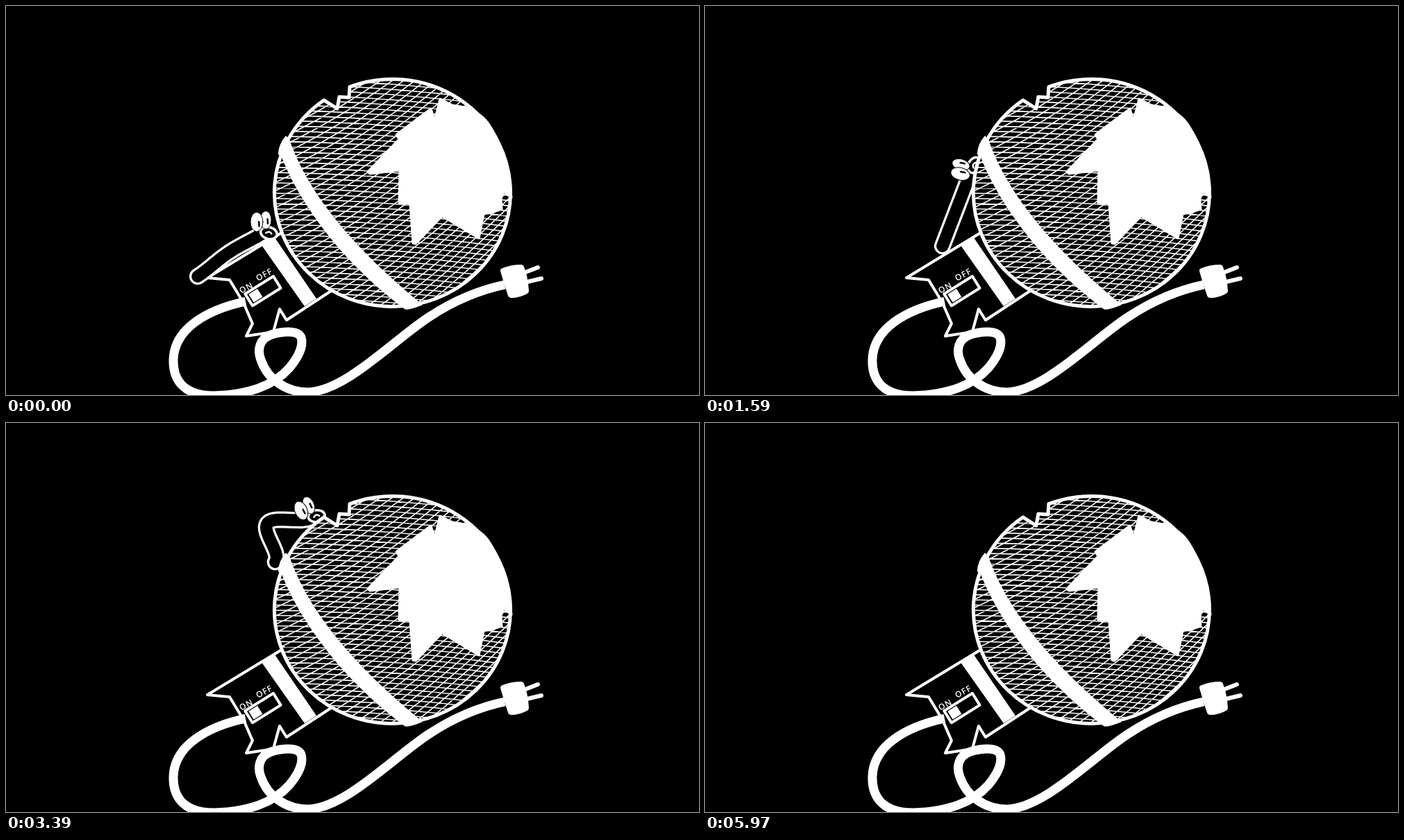
Recreate the animation shown at these times as an HTML page. Size 998x561 px, loop 7260 ms.

```html
<!DOCTYPE html>
<html lang="en">
<head>
<meta charset="utf-8">
<title>Worm and microphone</title>
<style>
  html, body { margin: 0; width: 100%; height: 100%; overflow: hidden; background: #000; }
  svg { display: block; width: 100%; height: 100%; }
  text { font: 600 12px "Open Sans", sans-serif; letter-spacing: 1px; fill: #fff; text-anchor: middle; }
</style>
</head>
<body>
<svg viewBox="0 0 998 561" fill="none" stroke-linejoin="round" stroke-linecap="round">
  <defs>
    <path id="ball" d="M495 116.6A170 164 0 0 1 726.5 269.5A170 164 0 0 1 556.5 433.5A170 164 0 0 1 386.5 269.5A170 164 0 0 1 458 135.8L477 148L480 131L494 132Z"/>
    <clipPath id="inside"><use href="#ball"/></clipPath>
    <!-- the way the worm crawls: handle, side of the ball, hole -->
    <path id="track" d="M276 390L374 325L386 224C384 190 402 150 444 134C460 126 480 118 488 134L490 260"/>
  </defs>
  <rect width="998" height="561" fill="#000"/>

  <g id="handle" stroke="#fff" stroke-width="4">
    <path fill="#000" d="M397 327L290 392L322 395L342 428L355 458L346 476L385 470L394 437L404 453L468 411"/>
    <path fill="#fff" stroke="none" d="M368 345L387 334L447 422L430 433Z"/>
    <g transform="translate(370 411) rotate(-32)">
      <rect x="-24" y="-10" width="48" height="20"/>
      <rect x="-20" y="-7" width="15" height="14" fill="#fff" stroke="none"/>
    </g>
    <g stroke="none">
      <text transform="translate(348 410) rotate(-28)">ON</text>
      <text transform="translate(374 391) rotate(-28)">OFF</text>
    </g>
  </g>

  <g id="cord" stroke="#fff">
    <path stroke-width="13" stroke-linecap="butt" d="M345 426C290 438 241 465 241 512C241 545 262 562 300 562C350 560 385 548 408 522C424 503 428 488 425 478C420 466 395 470 382 474C364 480 362 497 367 510C377 540 405 557 435 557C490 555 560 480 610 448C645 425 680 410 718 402"/>
    <path stroke-width="8" fill="#fff" d="M716 382Q728 377 742 377Q748 392 749 411Q739 417 727 417Q721 400 716 382Z"/>
    <path stroke-width="6" d="M748 384L766 377M750 398L771 393"/>
  </g>

  <g id="worm">
    <path class="body" stroke="#fff" stroke-width="24"/>
    <path class="body" stroke="#000" stroke-width="17.5"/>
    <g id="head">
      <ellipse cx="15" cy="14" rx="12" ry="8.5" fill="#000" stroke="#fff" stroke-width="3.5"/>
      <path d="M11 15Q15 10 19 14" stroke="#fff" stroke-width="2.5"/>
      <g fill="#fff" stroke="#000" stroke-width="1">
        <ellipse cx="6" cy="-3" rx="8" ry="13" transform="rotate(-15 6 -3)"/>
        <ellipse cx="-6" cy="3" rx="9" ry="14" transform="rotate(-15 -6 3)"/>
      </g>
      <path d="M-3 2L-1 8M8 -5L10 1" stroke="#000" stroke-width="2.5"/>
    </g>
  </g>

  <use href="#ball" fill="#000"/>
  <g clip-path="url(#inside)"><path id="mesh" stroke="#fff" stroke-width="1.6"/></g>
  <use href="#ball" stroke="#fff" stroke-width="5"/>
  <path fill="#fff" d="M403 187Q392 200 392 214L397 218C425 290 490 375 574 437Q578 440 600 431C520 365 440 285 408 192Z"/>
  <path fill="#fff" stroke="#fff" stroke-width="3" d="M625 134L643 143L661 146Q686 155 697 173Q717 205 722 235L728 276L722 272L717 267L713 278L714 293L702 297L688 300L681 335L628 303L590 343L586 342L582 285L566 284L567 237L524 242L521 239L566 192L562 186L568 181L612 148L617 166Z"/>
</svg>
<script>
const LOOP = 7260, STEP = 112.6, GONE = 53, LENGTH = 118;

const $ = id => document.getElementById(id);
const bodies = document.querySelectorAll(".body");

// Smooth 0 to 1 while k runs from a to b
function ease(k, a, b) {
  const u = Math.max(0, Math.min(1, (k - a) / (b - a)));
  return u * u * (3 - 2 * u);
}

function mesh() {
  let d = "";
  for (let y = 60; y < 460; y += 7.5) d += `M380 ${y}Q560 ${y + 2} 740 ${y + 28}`;
  for (let y = 90; y < 720; y += 12) d += `M380 ${y}Q560 ${y - 80} 740 ${y - 260}`;
  return d;
}

// Distances along the track: the head reaches out, then the tail is pulled in
const headAt = k => 116 + 125 * ease(k, 6, 18) + 90 * ease(k, 19, 30) + 46 * ease(k, 30, 40) + 90 * ease(k, 41, 50);
const tailAt = k => 30 * ease(k, 0, 6) + 118 * ease(k, 10, 19) + 95 * ease(k, 21, 30) + 157 * ease(k, 31, 56);
const tiltAt = k => 15 - 75 * ease(k, 6, 13) + 52 * ease(k, 19, 30) + 70 * ease(k, 30, 53);

// Straight line from tail to head, pushed outwards into a hump
function spine(tail, head, hump) {
  const dx = head.x - tail.x, dy = head.y - tail.y, len = Math.hypot(dx, dy);
  const points = [];
  for (let i = 0; i <= 30; i++) {
    const u = i / 30, bump = Math.sin(Math.PI * u) ** 2;
    const along = u - 0.07 * bump * hump / 44, out = hump * bump / len;
    points.push(`${tail.x + dx * along + dy * out} ${tail.y + dy * along - dx * out}`);
  }
  return "M" + points.join("L");
}

function draw(t) {
  const tick = Math.floor(t / 30) * 30;
  const k = Math.ceil((tick + 8) / STEP) - 1;
  $("worm").style.display = k < GONE ? "" : "none";
  if (k >= GONE) return;

  const from = tailAt(k), to = headAt(k), tilt = tiltAt(k);
  const tail = $("track").getPointAtLength(from), head = $("track").getPointAtLength(to);
  const slack = Math.max(0, Math.min(44, 1.9 * (LENGTH - to + from)));
  const hump = slack + (14 - slack) * ease(k, 31, 39);

  const d = spine(tail, head, hump);
  bodies.forEach(b => b.setAttribute("d", d));
  $("head").setAttribute("transform", `translate(${head.x} ${head.y}) rotate(${tilt}) translate(-9 -14)`);
}

$("mesh").setAttribute("d", mesh());
const start = performance.now();
function frame() {
  draw((performance.now() - start) % LOOP);
  requestAnimationFrame(frame);
}
frame();
</script>
</body>
</html>
```
